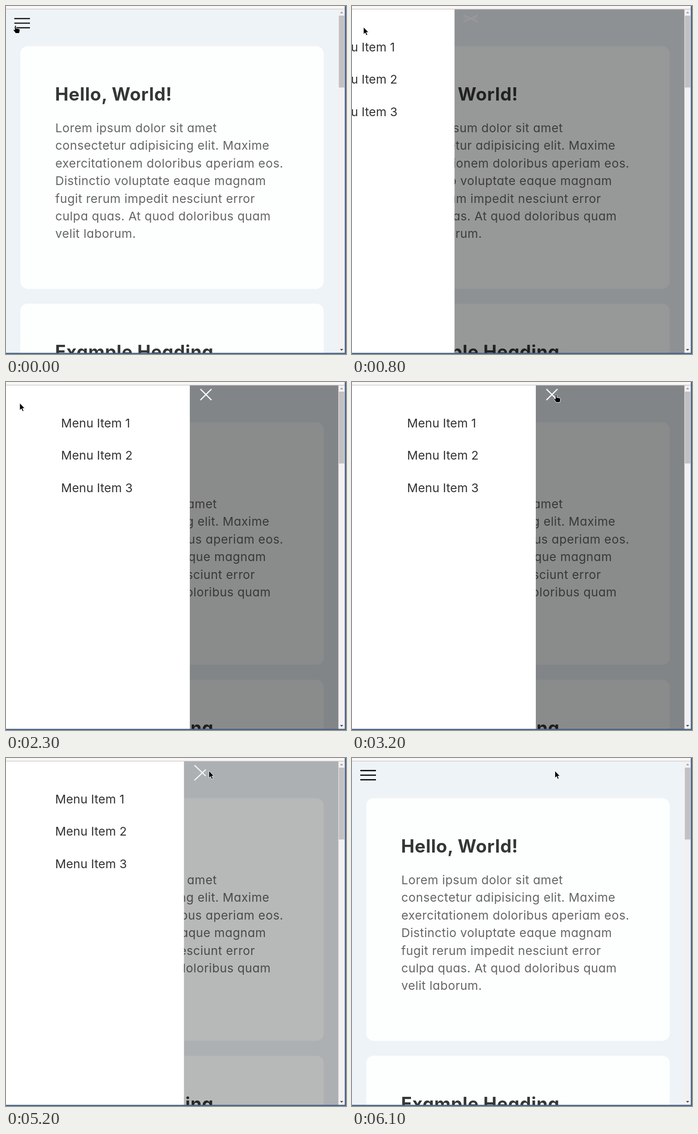
Write an HTML page that moves like this. It is 738 px wide and 758 px high and loops after 6200 ms.

```html
<!DOCTYPE html>
<html lang="en">
<head>
<meta charset="utf-8">
<title>Slide-in menu</title>
<style>
  html, body { margin: 0; width: 100%; height: 100%; overflow: hidden; }
  svg { display: block; width: 738px; height: 758px; }
  text { font-family: Inter, "Open Sans", sans-serif; font-optical-sizing: none; font-feature-settings: "cv11"; }
  .heading { font-size: 39px; font-weight: 700; letter-spacing: .65px; fill: #353736; }
  .copy { font-size: 26.2px; letter-spacing: .52px; fill: #656665; }
  .item { font-size: 26.2px; letter-spacing: .08px; fill: #333; }
</style>
</head>
<body>
<svg viewBox="0 0 738 758">
  <rect width="738" height="758" fill="#eef3f7"/>
  <g fill="#fdfffe">
    <rect x="31" y="87.5" width="658.5" height="528.5" rx="16"/>
    <rect x="31" y="648.5" width="658.5" height="528.5" rx="16"/>
  </g>
  <text class="heading" x="106.5" y="206">Hello, World!</text>
  <text class="heading" x="106.5" y="767">Example Heading</text>
  <g id="copy" class="copy"></g>

  <rect id="overlay" width="738" height="758"/>
  <g id="panel">
    <rect x="-399" width="399" height="758" fill="#fefffe"/>
    <g id="items" class="item"></g>
    <g id="burger">
      <rect id="top" x="-17" y="-1.3" width="34" height="2.6"/>
      <rect id="middle" x="-17" y="-1.3" width="34" height="2.6"/>
      <rect id="bottom" x="-17" y="-1.3" width="34" height="2.6"/>
    </g>
  </g>

  <!-- browser window -->
  <rect width="738" height="7" fill="#faf6f5"/>
  <rect y="6" width="738" height="1.5" fill="#cfcecf"/>
  <rect x="721.5" y="7.5" width="14.5" height="750" fill="#f3f0f2"/>
  <rect x="722.5" y="21" width="12" height="156.5" fill="#c2c0c2"/>
  <path d="M725 16h7l-3.5-4z" fill="#a3a3a3"/>
  <path d="M725 747h7l-3.5 4z" fill="#505050"/>
  <path d="M736.7 0V756.7H0" fill="none" stroke="#456285" stroke-width="2.6"/>

  <g id="cursor" stroke="#fff" stroke-linejoin="round">
    <path id="arrow" d="M0 0V15.5L3.6 12.2 6 18 8.6 16.9 6.2 11.3H10.8Z" stroke-width=".9"/>
    <path id="hand" stroke-width="1"
      d="M1 1C1-1 4-1 4 1V6L6 5.8 8.5 6.3 10.5 7.2C12 7.2 12 8 12 9V12L10.5 16.5H3L-1.5 10.5C-2.8 8.5-1 7.3 1 9.2Z"/>
  </g>
</svg>
<script>
const LOOP = 6200, PANEL_WIDTH = 399, DURATION = 600;
const OPEN_AT = 442, CLOSE_AT = 5056;
const $ = id => document.getElementById(id);
const clamp = v => Math.min(1, Math.max(0, v));
const smooth = v => { v = clamp(v); return v * v * (3 - 2 * v); };
const mix = (a, b, v) => a + (b - a) * v;

function bezier(x1, y1, x2, y2) {
  const at = (a, b, s) => 3 * (1 - s) ** 2 * s * a + 3 * (1 - s) * s * s * b + s ** 3;
  return x => {
    let low = 0, high = 1;
    for (let i = 0; i < 24; i++) {
      const mid = (low + high) / 2;
      if (at(x1, x2, mid) < x) low = mid; else high = mid;
    }
    return at(y1, y2, (low + high) / 2);
  };
}
const slide = bezier(.9, 0, .33, 1);
const fade = bezier(.25, .1, .25, 1);
const collapse = v => smooth(v * 2);

function addLines(id, lines, x, y, step) {
  lines.forEach((line, i) => {
    const text = document.createElementNS("http://www.w3.org/2000/svg", "text");
    text.setAttribute("x", x);
    text.setAttribute("y", y + i * step);
    text.textContent = line;
    $(id).append(text);
  });
}
addLines("copy", [
  "Lorem ipsum dolor sit amet",
  "consectetur adipisicing elit. Maxime",
  "exercitationem doloribus aperiam eos.",
  "Distinctio voluptate eaque magnam",
  "fugit rerum impedit nesciunt error",
  "culpa quas. At quod doloribus quam",
  "velit laborum."
], 107, 275, 38.4);
addLines("items", [1, 2, 3].map(n => "Menu Item " + n), 119.5 - PANEL_WIDTH, 99, 70.4);

// 0 = menu closed, 1 = menu open
function openness(t, ease) {
  return t < CLOSE_AT
    ? ease(clamp((t - OPEN_AT) / DURATION))
    : 1 - ease(clamp((t - CLOSE_AT) / DURATION));
}

function drawMenu(t) {
  const open = openness(t, slide), joined = openness(t, collapse);
  const angle = 45 * open;
  const shade = Math.round(mix(t < CLOSE_AT ? 32 : 6, 250, open));
  $("overlay").setAttribute("opacity", .455 * openness(t, fade));
  $("panel").setAttribute("transform", `translate(${PANEL_WIDTH * open} 0)`);
  $("burger").setAttribute("transform", "translate(35 27.4)");
  $("burger").setAttribute("fill", `rgb(${shade},${shade},${shade})`);
  $("top").setAttribute("transform", `rotate(${angle})`);
  $("middle").setAttribute("transform", `translate(0 ${10 * (1 - joined)})`);
  $("middle").setAttribute("opacity", 1 - open);
  $("bottom").setAttribute("transform", `translate(0 ${20 * (1 - joined)}) rotate(${-angle})`);
}

function drawCursor(t) {
  const nudge = smooth((t - 100) / 200), travel = clamp((t - 2250) / 800);
  const x = mix(mix(18, 25, nudge), 440.5, smooth(travel));
  const y = mix(mix(43, 46, nudge), 28, travel ** 4);
  const pointing = t < 580 || (t >= 3000 && t < 5090);
  $("cursor").setAttribute("transform", `translate(${x} ${y})`);
  $("hand").setAttribute("visibility", pointing ? "visible" : "hidden");
  $("arrow").setAttribute("visibility", pointing ? "hidden" : "visible");
}

function frame() {
  const t = performance.now() % LOOP;
  drawMenu(t);
  drawCursor(t);
  requestAnimationFrame(frame);
}
frame();
</script>
</body>
</html>
```
